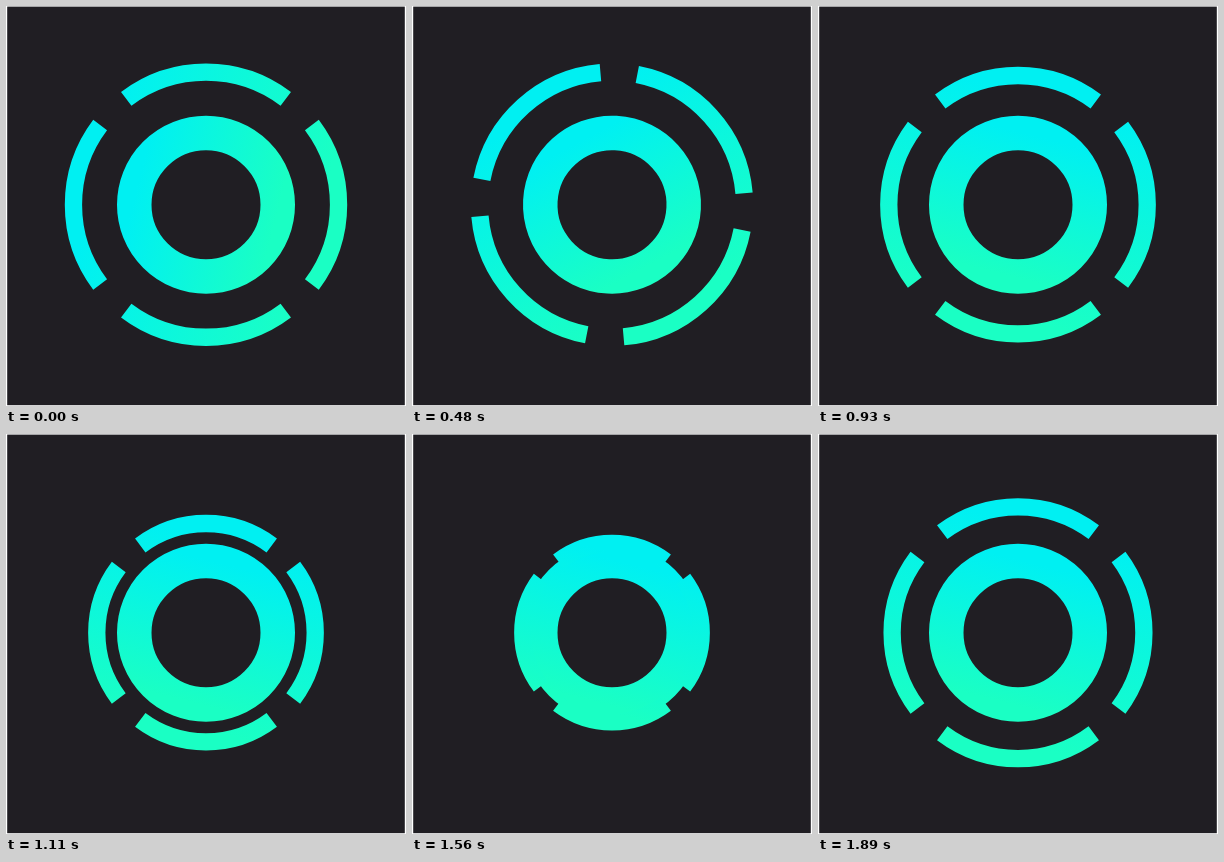
Animation, 400 px wide and 400 px high, one loop 1.92 s. Source, as an HTML page with a canvas:

```html
<!DOCTYPE html>
<html lang="en">
<head>
<meta charset="utf-8">
<title>Pulsing ring</title>
<style>
  html, body { margin: 0; width: 100%; height: 100%; overflow: hidden; background: #fff; }
  canvas { display: block; width: 400px; height: 400px; }
</style>
</head>
<body>
<canvas id="stage" width="400" height="400"></canvas>
<script>
const ctx = document.getElementById('stage').getContext('2d');
const LOOP = 1920, STEP = 30;
const RAD = Math.PI / 180;
const TILT = 14 * RAD;
const HALF_ARC = 37 * RAD;

// Strokes an arc whose gradient spans the full circle of the outer radius.
function ring(outer, width, from, to) {
  const x = outer * Math.cos(TILT), y = outer * Math.sin(TILT);
  const fill = ctx.createLinearGradient(-x, -y, x, y);
  fill.addColorStop(0.1, '#00f0f2');
  fill.addColorStop(0.9, '#1affc4');
  ctx.strokeStyle = fill;
  ctx.lineWidth = width;
  ctx.beginPath();
  ctx.arc(0, 0, outer - width / 2, from, to);
  ctx.stroke();
}

function draw(t) {
  const turn = Math.min(t / 900, 1) * Math.PI / 2;
  const inset = Math.max(0, 525 - Math.abs(t - 1425)) / 9;

  ctx.setTransform(1, 0, 0, 1, 0, 0);
  ctx.fillStyle = '#fff';
  ctx.fillRect(0, 0, 400, 400);
  ctx.fillStyle = '#201e23';
  ctx.fillRect(1.2, 0.6, 397.6, 398.6);

  ctx.translate(200, 198.7);
  ctx.rotate(turn);
  ring(89, 34.5, 0, 2 * Math.PI);
  for (let i = 0; i < 4; i++) {
    const mid = i * Math.PI / 2;
    ring(141.2 - inset, 17.3, mid - HALF_ARC, mid + HALF_ARC);
  }
}

const start = performance.now();
function tick() {
  const t = (performance.now() - start) % LOOP;
  draw(Math.floor(t / STEP) * STEP);
  requestAnimationFrame(tick);
}
tick();
</script>
</body>
</html>
```
